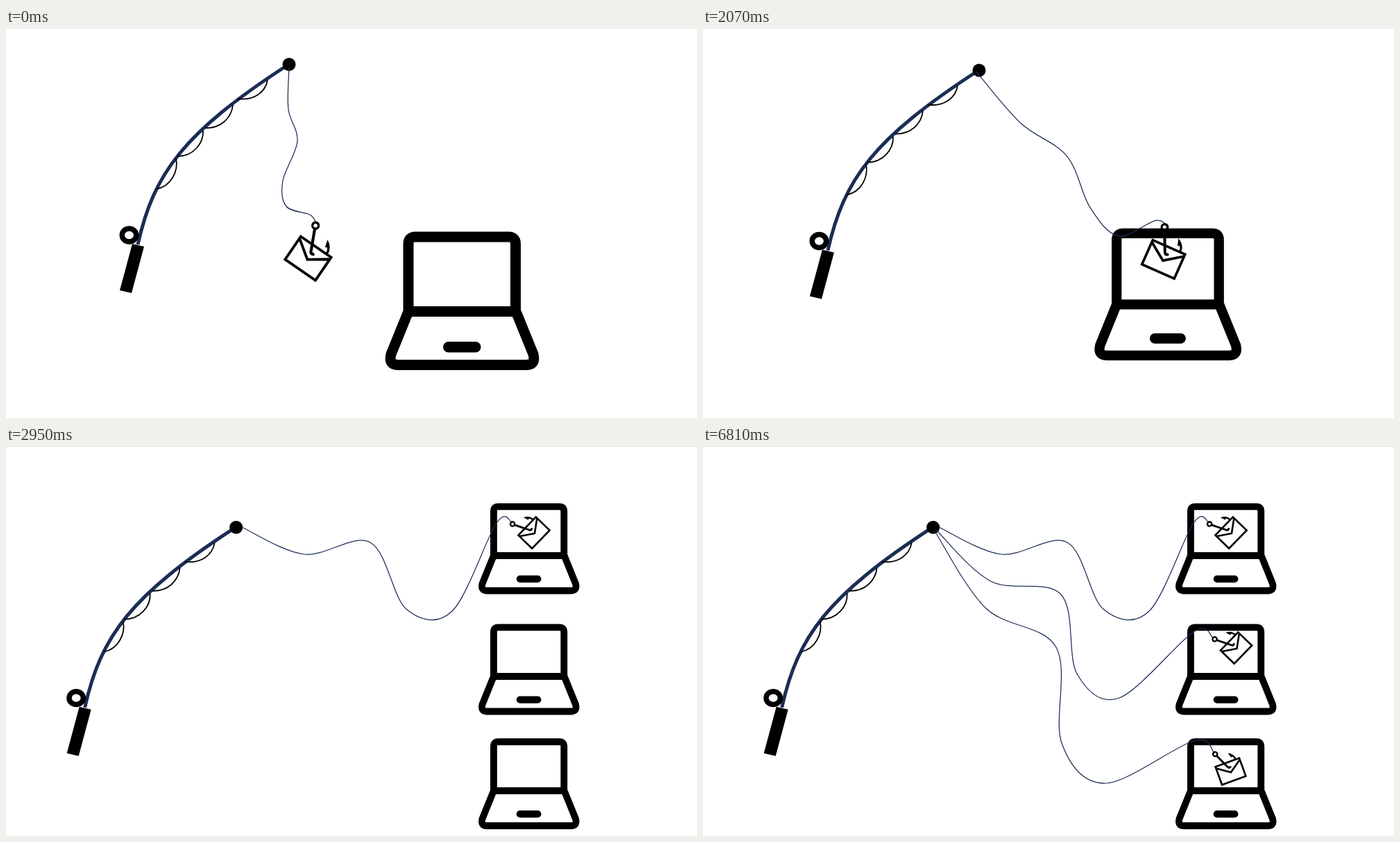
Animation, 996 px wide and 562 px high, one loop 8 s. Source, as an HTML page with a canvas:

```html
<!DOCTYPE html>
<html lang="en">
<head>
<meta charset="utf-8">
<title>Phishing rod</title>
<style>
  html, body { margin: 0; width: 100%; height: 100%; overflow: hidden; background: #fff; }
  canvas { display: block; width: 996px; height: 562px; }
</style>
</head>
<body>
<canvas id="stage" width="996" height="562"></canvas>
<script>
const ctx = document.getElementById('stage').getContext('2d');
const LOOP = 8000, NAVY = '#1b2d55', BLACK = '#000';

// Each catch: knots of the line from rod tip to hook, and the envelope's x, y, scale, degrees
const hang = {
  line: [[408, 56], [407, 117], [420, 163], [399, 220], [404, 257], [438, 269], [447, 281]],
  mail: [435.5, 332, 1, 34.5]
};
const bite = {
  line: [[410, 56], [467, 134], [526, 190], [555, 259], [590, 305], [641, 299], [657, 314]],
  mail: [649, 365, 1, 34.5]
};
const top1 = {
  line: [[340, 117], [430, 156], [525, 139], [577, 235], [643, 238], [707, 111], [730, 111]],
  mail: [761, 125, .69, -46]
};
const mid = {
  line: [[336, 121], [415, 195], [516, 214], [539, 328], [600, 363], [707, 268], [735, 276]],
  mail: [768.5, 291, .69, -46]
};
const low = {
  line: [[333, 121], [408, 234], [509, 290], [517, 428], [580, 486], [707, 425], [737, 442]],
  mail: [760.5, 469, .69, -20]
};

const bigLaptop = [547, 293, 1];
const smallLaptop = y => [681.3, y, .656];

const rod = new Path2D('M190 312C213 209 256 151 405 54');
const guides = new Path2D('M377 75C374 92 358 105 334 102M327 111C325 130 309 145 287 144' +
  'M284 148C285 166 270 185 247 185M245 188C249 206 238 228 217 232');
const handle = new Path2D('M182 311L199 315L181 382L164 378Z');
const laptopFrame = new Path2D('M33 115.5V18Q33 8 43 8H177.5Q187.5 8 187.5 18V115.5Z' +
  'M33 115.5L8 177Q4 192.5 18 192.5H203Q217 192.5 213 177L188 115.5Z');
const envelope = new Path2D('M-26.5 -20H26.5V20H-26.5ZM-25.5 -16L0 2L25.5 -16');
const shaft = new Path2D('M-16 -40L-3 -12Q-1 -6 4 -10');
const barb = new Path2D('M7.8 -38Q20 -32 20 -20H16.5Q16.5 -26 13.5 -28.5L11 -27Z');

const span = (t, from, to) => Math.min(1, Math.max(0, (t - from) / (to - from)));
const mix = (a, b, p) => a.map((v, i) => v + (b[i] - v) * p);

// cubic-bezier(.25, .1, .25, 1)
function ease(x) {
  let lo = 0, hi = 1;
  for (let i = 0; i < 24; i++) {
    const s = (lo + hi) / 2;
    if (.75 * s * (1 - s) + s ** 3 < x) lo = s; else hi = s;
  }
  return .3 * lo * (1 - lo) ** 2 + 3 * lo * lo * (1 - lo) + lo ** 3;
}

// Blend two catches; the line stretches around a pivot halfway through
function blend(a, b, p, [pivotX, pivotY], [stretchX, stretchY]) {
  const pulse = Math.sin(Math.PI * p);
  const line = a.line.map((knot, i) => {
    const [x, y] = mix(knot, b.line[i], p);
    return [x + (x - pivotX) * stretchX * pulse, y + (y - pivotY) * stretchY * pulse];
  });
  return { line, mail: mix(a.mail, b.mail, p) };
}

function stroke(path, width, color = BLACK) {
  ctx.lineWidth = width;
  ctx.strokeStyle = color;
  ctx.stroke(path);
}

function disc(x, y, r) {
  const path = new Path2D();
  path.arc(x, y, r, 0, 7);
  return path;
}

function placed([x, y, scale = 1, degrees = 0], draw) {
  ctx.save();
  ctx.translate(x, y);
  ctx.rotate(degrees * Math.PI / 180);
  ctx.scale(scale, scale);
  draw();
  ctx.restore();
}

function faded(alpha, draw) {
  ctx.globalAlpha = alpha;
  if (alpha) draw();
  ctx.globalAlpha = 1;
}

function drawRod() {
  stroke(rod, 5, NAVY);
  stroke(guides, 1.8);
  ctx.fill(handle);
  const reel = new Path2D();
  reel.ellipse(177.5, 298.5, 10.2, 9.4, 0, 0, 7);
  stroke(reel, 7.5);
  ctx.fill(disc(408, 52.5, 9.5));
}

function drawLaptop() {
  stroke(laptopFrame, 15);
  const pad = new Path2D();
  pad.roundRect(83, 159, 54.5, 15.5, 7.75);
  ctx.fill(pad);
}

function drawMail() {
  ctx.lineJoin = 'miter';
  stroke(envelope, 3.8);
  stroke(shaft, 4.2);
  stroke(disc(-18, -45, 4.5), 3.4);
  ctx.fill(barb);
}

// Smooth curve whose direction at each knot follows its neighbours
function drawLine(knots) {
  const last = knots.length - 1;
  const handleAt = i => {
    const before = knots[Math.max(0, i - 1)], after = knots[Math.min(last, i + 1)];
    return [(after[0] - before[0]) / 6, (after[1] - before[1]) / 6];
  };
  const path = new Path2D();
  path.moveTo(...knots[0]);
  for (let i = 0; i < last; i++) {
    const [x1, y1] = knots[i], [x2, y2] = knots[i + 1];
    const [dx1, dy1] = handleAt(i), [dx2, dy2] = handleAt(i + 1);
    path.bezierCurveTo(x1 + dx1, y1 + dy1, x2 - dx2, y2 - dy2, x2, y2);
  }
  stroke(path, 1.25, NAVY);
}

function drawCatch({ line, mail }) {
  drawLine(line);
  placed(mail, drawMail);
}

function render(t) {
  const swing = ease(span(t, 505, 1540));
  const cast = ease(span(t, 1948, 2955));

  ctx.fillStyle = '#fff';
  ctx.fillRect(0, 0, 996, 562);
  ctx.fillStyle = '#e6e6e6';
  ctx.fillRect(0, 0, 996, 1);
  ctx.fillStyle = BLACK;
  ctx.lineJoin = 'round';

  placed(mix(bigLaptop, smallLaptop(256.2), cast), drawLaptop);
  faded(span(t, 2400, 2880), () => {
    placed(smallLaptop(82.2), drawLaptop);
    placed(smallLaptop(421), drawLaptop);
  });
  placed([-76.3 * cast, 64.7 * cast], drawRod);

  drawCatch(cast > 0
    ? blend(bite, top1, cast, [560, 130], [.11, .05])
    : blend(hang, bite, swing, [480, 150], [-.1, .1]));
  faded(span(t, 3890, 4300), () => drawCatch(mid));
  faded(span(t, 6220, 6780), () => drawCatch(low));
}

const start = performance.now();
function tick() {
  render((performance.now() - start) % LOOP);
  requestAnimationFrame(tick);
}
tick();
</script>
</body>
</html>
```
